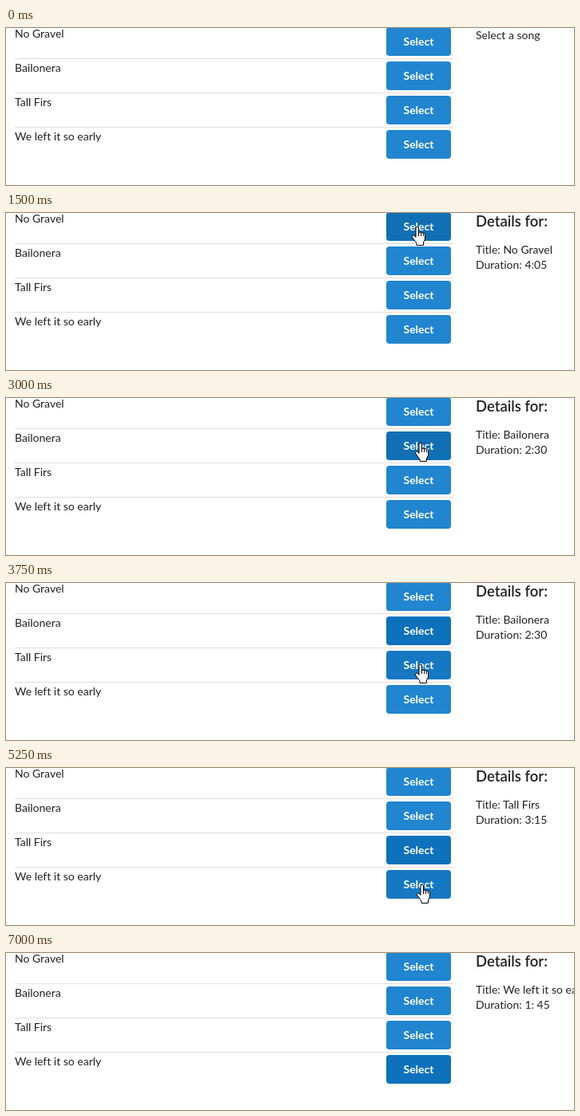
An HTML page that plays this animation: 711 by 197 pixels, repeating every 7.25 s.

```html
<!DOCTYPE html>
<html lang="en">
<head>
<meta charset="utf-8">
<title>Song list</title>
<style>
  html, body { margin: 0; width: 100%; height: 100%; overflow: hidden; background: #fff; }
  svg {
    display: block; width: 711px; height: 197px; fill: #212121;
    font: 14px Lato, sans-serif; font-variant-ligatures: none;
  }
  .rule { fill: #dededf; }
  .btn { fill: #2185d0; }
  .btn.hover { fill: #1678c2; }
  .btn.press { fill: #1a69a4; }
  .btn.settle { fill: #126fb4; }
  .btn.focus { fill: #0d71bb; }
  .label { fill: #fff; font-weight: 700; text-anchor: middle; }
  .heading { font-size: 18.5px; font-weight: 600; }
  .cursor { fill: #fff; stroke: #000; stroke-linejoin: round; }
</style>
</head>
<body>
<svg viewBox="0 0 711 197">
  <g id="list"></g>
  <text id="hint" x="588" y="14">Select a song</text>
  <g id="details">
    <text class="heading" x="588" y="16.5">Details for:</text>
    <text id="title" x="588" y="51"></text>
    <text id="duration" x="588" y="70"></text>
  </g>
  <path id="arrow" class="cursor" d="M.5.5V16.5L4.2 13L6.5 18.5H8.3L9.3 17.6L7 12H11.5Z"/>
  <g id="hand" class="cursor">
    <path d="M5 13.5V2a1.75 1.75 0 0 1 3.5 0V8.2q.2-1.2 1.6-1.2t1.5 1.6q.2-1.1 1.4-1.1t1.4 1.8q.3-.9 1.2-.6t.9 1.8V16l-2 4v3.5H6V21L.8 13.8q-.9-2.5.9-2.8t3.3 2.5z"/>
    <path fill="none" d="M8.5 8v4M11.6 8.6V12M14.4 9.3V12"/>
  </g>
</svg>
<script>
const TICK = 250, LOOP = 7250;
const songs = [
  ["No Gravel", "4:05"],
  ["Bailonera", "2:30"],
  ["Tall Firs", "3:15"],
  ["We left it so early", "1: 45"]
];

// Each cue starts with the tick at which it takes effect.
const buttonCues = [
  [[0, ""], [5, "hover"], [6, "settle"], [7, "focus"], [12, ""]],
  [[0, ""], [4, "hover"], [5, ""], [11, "hover"], [12, "settle"], [13, "focus"], [16, ""]],
  [[0, ""], [3, "hover"], [4, ""], [15, "hover"], [16, "press"], [17, "focus"], [22, ""]],
  [[0, ""], [20, "hover"], [22, "settle"], [23, "focus"]]
];
const detailCues = [[0, -1], [6, 0], [12, 1], [17, 2], [22, 3]];
const cursorCues = [
  [0, ""], [2, "arrow", 445, 159], [3, "hand", 476, 104], [4, "hand", 496, 50],
  [5, "hand", 506, 15], [6, "hand", 508, 17], [7, "hand", 508, 18],
  [10, "hand", 509, 44], [11, "hand", 512, 58], [12, "hand", 512, 56],
  [14, "hand", 516, 71], [15, "hand", 512, 102], [16, "hand", 511, 108],
  [17, "hand", 506, 114], [19, "arrow", 511, 124], [20, "hand", 514, 131],
  [21, "hand", 514, 146], [22, "hand", 513, 145], [23, "hand", 513, 144],
  [25, "hand", 503, 146], [26, "hand", 485, 149], [27, "arrow", 417, 170], [28, ""]
];

const $ = id => document.getElementById(id);
const at = (cues, tick) => cues.findLast(cue => cue[0] <= tick);
const show = (el, on) => el.setAttribute("visibility", on ? "visible" : "hidden");

$("list").innerHTML = songs.map(([name], i) => {
  const y = 43 * i;
  return `<text x="11" y="${y + 12}">${name}</text>` +
    (i ? `<rect class="rule" x="11" y="${y - 5}" width="549" height="1"/>` : "") +
    `<rect class="btn" x="476" y="${y - 1}" width="81" height="36" rx="4"/>` +
    `<text class="label" x="516.5" y="${y + 22}">Select</text>`;
}).join("");
const buttons = document.querySelectorAll(".btn");

function draw(tick) {
  buttons.forEach((b, i) => b.setAttribute("class", "btn " + at(buttonCues[i], tick)[1]));

  const song = songs[at(detailCues, tick)[1]];
  show($("hint"), !song);
  show($("details"), song);
  if (song) {
    $("title").textContent = "Title: " + song[0];
    $("duration").textContent = "Duration: " + song[1];
  }

  const [, kind, x, y] = at(cursorCues, tick);
  for (const id of ["arrow", "hand"]) show($(id), id === kind);
  if (kind) $(kind).setAttribute("transform", `translate(${x} ${y})`);
}

const start = performance.now();
let last = -1;
function frame() {
  const tick = Math.floor((performance.now() - start) % LOOP / TICK);
  if (tick !== last) draw(last = tick);
  requestAnimationFrame(frame);
}
frame();
</script>
</body>
</html>
```
